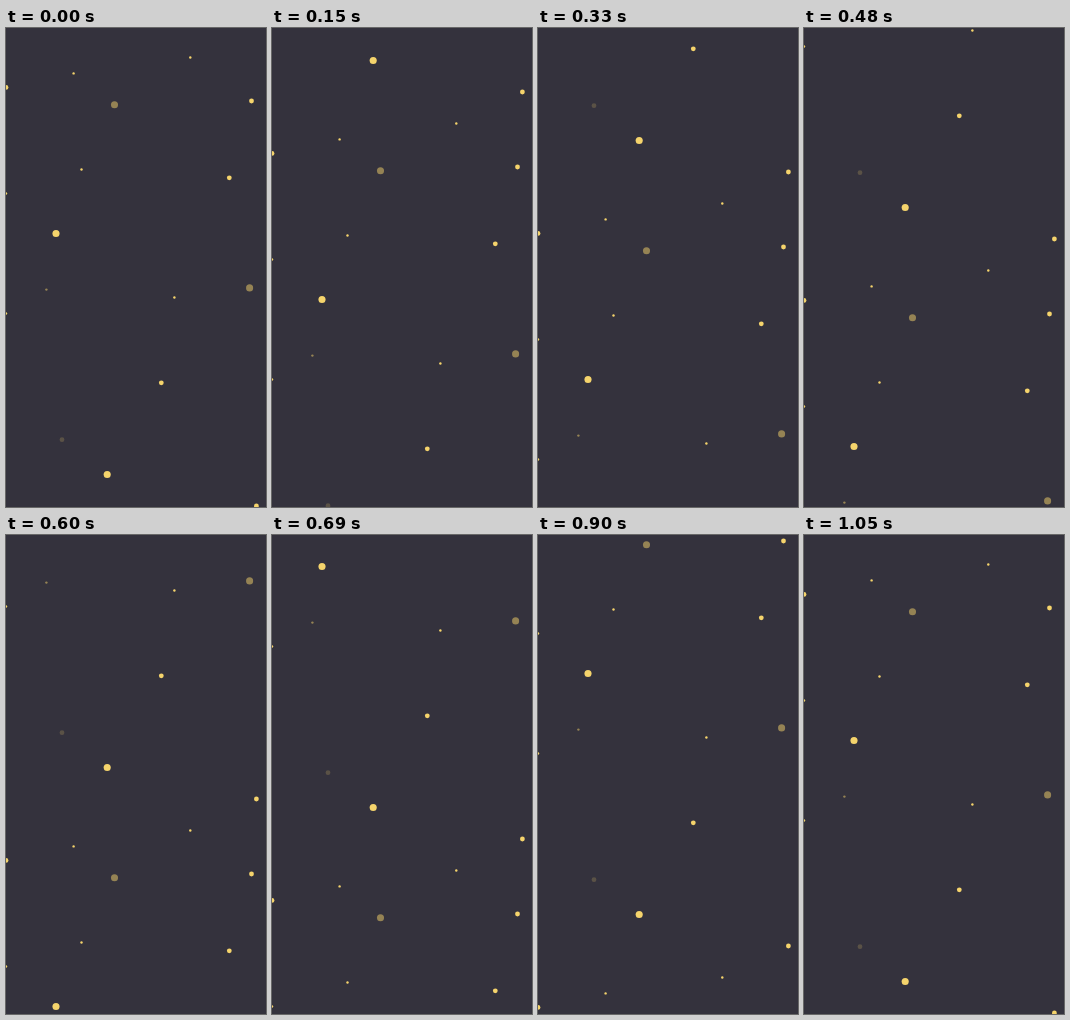
Recreate the animation shown at these times as an HTML page with a canvas. Size 260 by 479 pixels, loop 1080 ms.

```html
<!DOCTYPE html>
<html lang="en">
<head>
<meta charset="utf-8">
<title>Falling dots</title>
<style>
html, body { margin: 0; height: 100%; overflow: hidden; }
canvas { display: block; }
</style>
</head>
<body>
<canvas id="sky" width="260" height="479"></canvas>
<script>
const ctx = document.getElementById('sky').getContext('2d');
const LOOP = 1080, TICK = 30, PERIOD = 480, STEP = PERIOD / 36;
const SKIP = 27; // one step is dropped here, so the last tick meets the first
const SMALL = 1.2, MEDIUM = 2.4, LARGE = 3.55;

// Draws dots of one size, each given by its starting centre
function dots(shift, radius, alpha, ...centres) {
  ctx.globalAlpha = alpha;
  for (const [x, y] of centres) {
    ctx.beginPath();
    ctx.arc(x, (y + shift) % PERIOD, radius, 0, 2 * Math.PI);
    ctx.fill();
  }
}

function draw(now) {
  const tick = Math.floor(now % LOOP / TICK);
  const shift = Math.floor((tick + (tick >= SKIP)) * STEP);
  ctx.globalAlpha = 1;
  ctx.fillStyle = '#34323d';
  ctx.fillRect(0, 0, 260, 479);
  ctx.fillStyle = '#f5d46c';
  dots(shift, SMALL, 1, [184.3, 29.5], [67.6, 45.4], [75.5, 141.5],
    [0, 165.5], [168.4, 269.5], [0, 285.5]);
  dots(shift, SMALL, .5, [40.4, 261.6]);
  dots(shift, MEDIUM, 1, [0, 59.4], [245.5, 73], [223.3, 149.8],
    [155.3, 354.8], [250.4, 478]);
  dots(shift, MEDIUM, .2, [56, 411.7]);
  dots(shift, LARGE, 1, [50, 205.5], [101.2, 446.5]);
  dots(shift, LARGE, .5, [108.5, 76.7], [243.6, 259.9]);
}

const start = performance.now();
function frame() {
  draw(performance.now() - start);
  requestAnimationFrame(frame);
}
frame();
</script>
</body>
</html>
```
